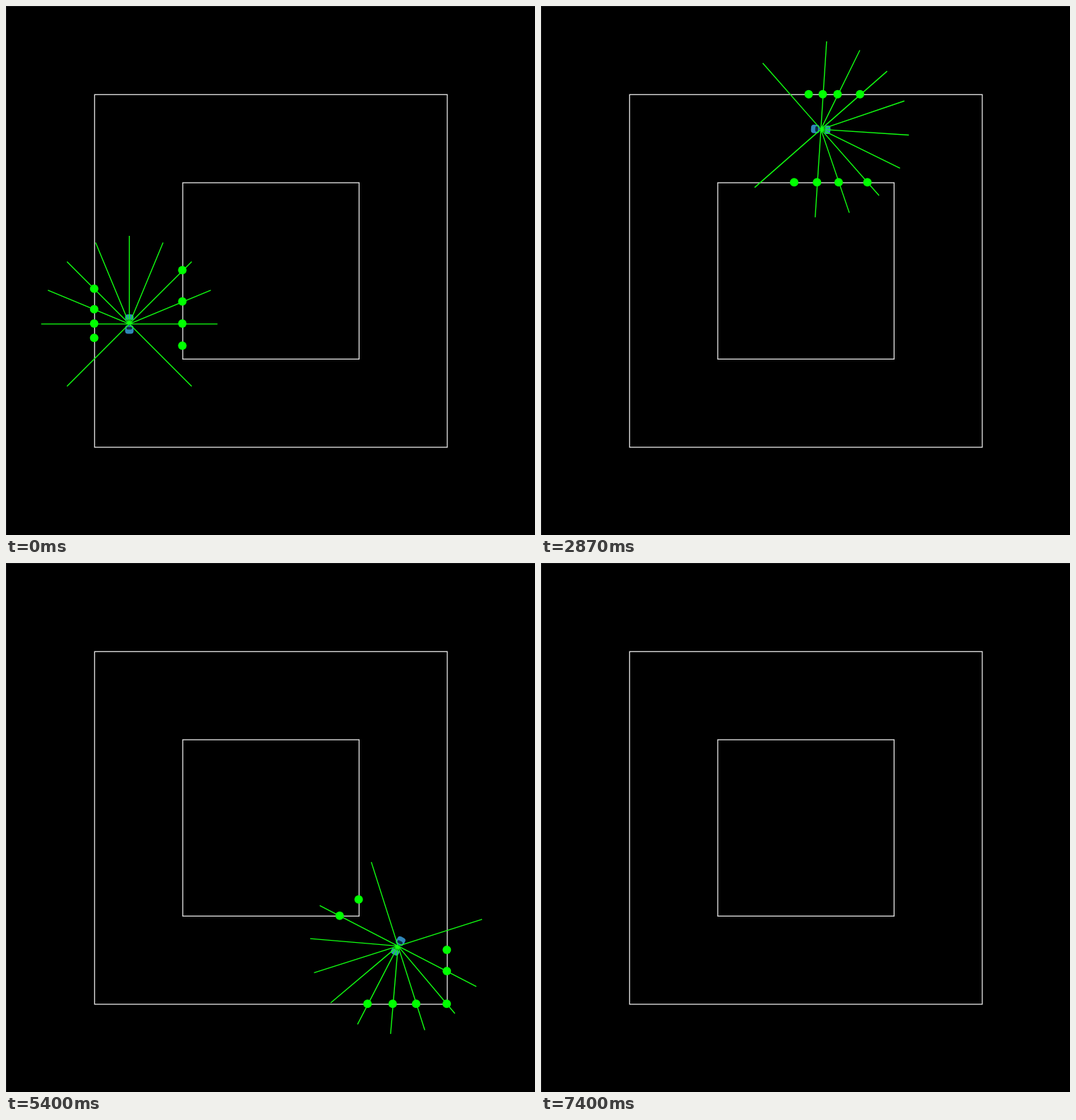
Write an HTML page with a canvas that moves like this. It is 748 by 748 pixels and loops after 7430 ms.

```html
<!DOCTYPE html>
<html lang="en">
<head>
<meta charset="utf-8">
<title>Sensor car</title>
<style>
html, body { margin: 0; width: 100%; height: 100%; overflow: hidden; background: #000; }
canvas { display: block; }
</style>
</head>
<body>
<canvas width="748" height="748"></canvas>
<script>
const ctx = document.querySelector('canvas').getContext('2d');
const LOOP = 7430, STEP = 100 / 3;
const UNIT = 748 / 600;             // the track lives on a 600 unit grid
const RAY = 100 * UNIT, RANGE = 99 * UNIT;
const SQUARES = [[100, 500], [200, 400]].map(s => s.map(v => v * UNIT));

// unit vector for a heading in degrees, clockwise from up
const aim = deg => [Math.sin(deg * Math.PI / 180), -Math.cos(deg * Math.PI / 180)];

// waypoints: time, x, y, heading
const ROUTE = [
  [0, 174.4, 449.6, 0],
  [1393, 174.4, 272.5, 0],
  [2033, 241.6, 184.3, 74],
  [3067, 433.5, 177, 94],
  [3733, 534.3, 235.3, 156.3],
  [4667, 538.5, 407, 164],
  [5367, 557, 536, 203],
  [6167, 421.4, 589.5, 292],
  [6900, 268.5, 557, 278],
  [7400, 155.6, 509.9, 320]
];

// px per ms: speeds up on the first straight and again on the last two sides
const speed = t => .064 + 9e-5 * Math.min(t, 1393) + 3e-5 * Math.max(0, t - 5400);

// smooth curve through the waypoints; the car points along it
function poseAt(t) {
  const i = Math.max(1, ROUTE.findIndex(p => p[0] >= t));
  const [t0, x0, y0, h0] = ROUTE[i - 1], [t1, x1, y1, h1] = ROUTE[i];
  const dt = t1 - t0, u = (t - t0) / dt, w = 1 - u;
  const d0 = aim(h0).map(c => c * speed(t0) * dt), d1 = aim(h1).map(c => c * speed(t1) * dt);
  const place = (a, b, k) => a + (b - a) * u * u * (3 - 2 * u) + d0[k] * u * w * w - d1[k] * u * u * w;
  const slope = (a, b, k) => 6 * (b - a) * u * w + d0[k] * w * (1 - 3 * u) + d1[k] * u * (3 * u - 2);
  return {
    x: place(x0, x1, 0),
    y: place(y0, y1, 1),
    h: Math.atan2(slope(x0, x1, 0), -slope(y0, y1, 1)) * 180 / Math.PI
  };
}

// nearest wall point on a ray, or null
function hit(x, y, angle) {
  const [dx, dy] = aim(angle);
  let best = RANGE, point = null;
  for (const [a, b] of SQUARES) for (const wall of [a, b]) {
    for (const vertical of [true, false]) {
      const d = vertical ? (wall - x) / dx : (wall - y) / dy;
      const px = x + dx * d, py = y + dy * d, along = vertical ? py : px;
      if (d > 0 && d < best && along >= a && along <= b) {
        best = d;
        point = [px, py];
      }
    }
  }
  return point;
}

function drawCar({ x, y, h }) {
  const blob = (color, ...box) => {
    ctx.fillStyle = color;
    ctx.beginPath();
    ctx.roundRect(...box);
    ctx.fill();
  };
  ctx.save();
  ctx.translate(x, y);
  ctx.rotate(h * Math.PI / 180);
  blob('#2b8fae', -6, -13.5, 12, 9, 4);
  blob('#04141c', -5, -6, 10, 10, 2);
  blob('#2f86b8', -6, 2, 12, 12, 4);
  blob('#0b2c40', -4, 4, 8, 4, 2);
  ctx.restore();
}

function draw(t) {
  const pose = poseAt(t), { x, y, h } = pose;
  ctx.fillStyle = '#000';
  ctx.fillRect(0, 0, 748, 748);
  ctx.fillStyle = '#16161a';
  ctx.fillRect(0, 0, 748, 1);
  ctx.fillRect(0, 0, 1, 748);

  ctx.lineWidth = 1.25;
  ctx.strokeStyle = '#f0f0f0';
  for (const [a, b] of SQUARES) ctx.strokeRect(a + .6, a + .6, b - a, b - a);

  drawCar(pose);

  const front = Array.from({ length: 9 }, (_, i) => (i - 4) * 22.5);
  ctx.lineWidth = 1.4;
  ctx.strokeStyle = '#1f1';
  ctx.beginPath();
  for (const turn of [...front, -135, 135]) {
    const [dx, dy] = aim(h + turn);
    ctx.moveTo(x, y);
    ctx.lineTo(x + RAY * dx, y + RAY * dy);
  }
  ctx.stroke();

  // each rear sensor looks farther back when its first ray finds nothing
  const sense = turn => hit(x - .6, y - .6, h + turn);
  const rear = [-1, 1].map(side => sense(side * 112.5) || sense(side * 135));
  ctx.fillStyle = '#0f0';
  for (const dot of [...front.map(sense), ...rear]) if (dot) {
    ctx.beginPath();
    ctx.arc(...dot, 6, 0, 7);
    ctx.fill();
  }
}

function tick() {
  const t = performance.now() % LOOP;
  draw(Math.floor((t + 3.4) / STEP) * STEP);
  requestAnimationFrame(tick);
}
tick();
</script>
</body>
</html>
```
